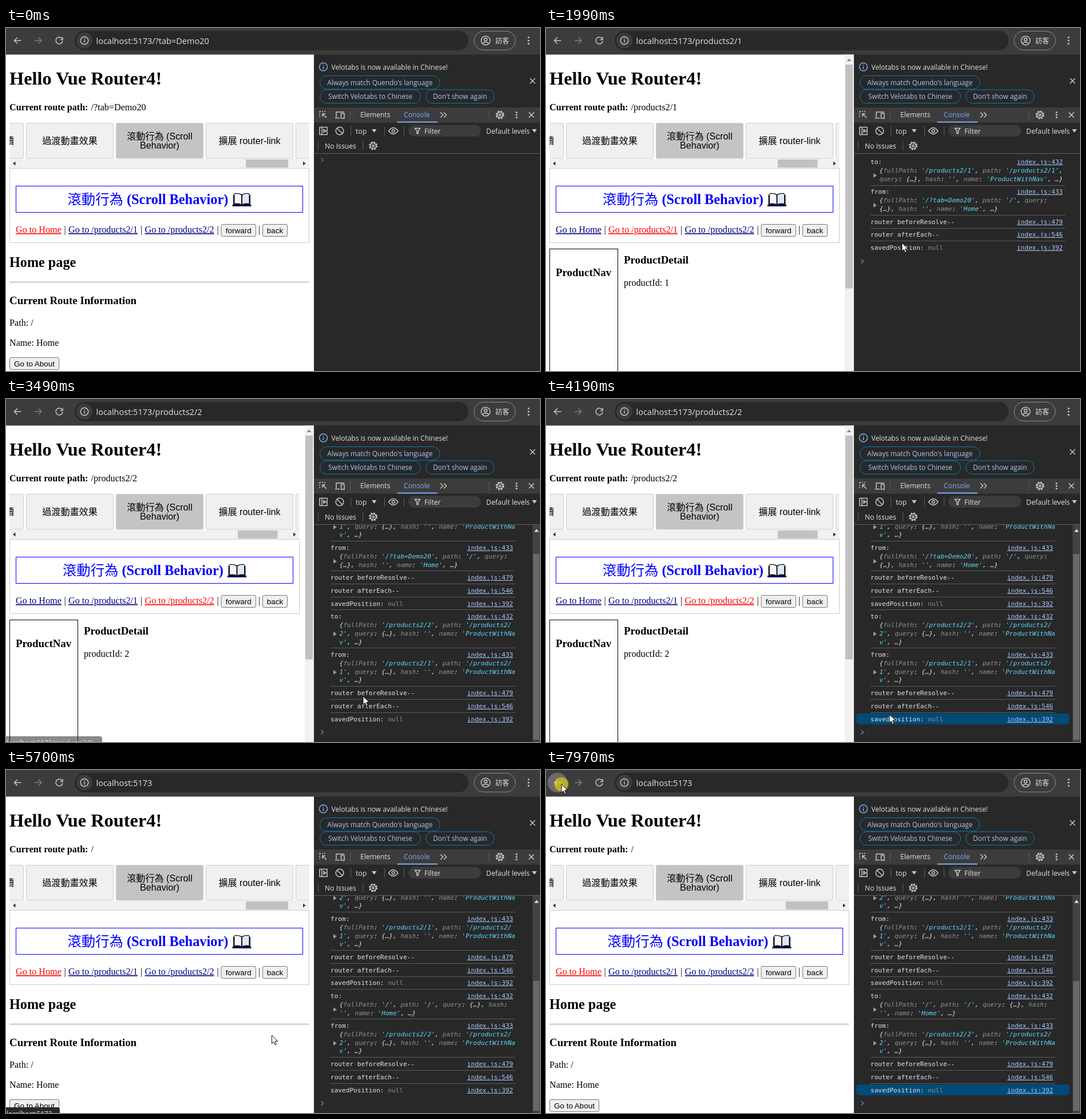
An HTML page that plays this animation: 933x600 px, repeating every 8000 ms.

```html
<!DOCTYPE html>
<html lang="zh-Hant">
<head>
<meta charset="utf-8">
<title>Router scroll behavior</title>
<style>
  html, body { margin: 0; width: 933px; height: 600px; overflow: hidden; background: #282828; }
  svg { position: absolute; left: 0; top: 0; }
  text { white-space: pre; }
  .serif { font-family: "Liberation Serif", "Noto Sans CJK TC", "Noto Sans CJK", serif; font-size: 16.15px; }
  .sans { font-family: "Liberation Sans", "Noto Sans CJK TC", "Noto Sans CJK", sans-serif; font-size: 16.1px;
    font-weight: 300; }
  .ui { font-family: "Open Sans", "Noto Sans CJK TC", "Noto Sans CJK", sans-serif; font-size: 12.2px; fill: #e3e3e3; }
  .bold { font-weight: bold; }
  .mid { text-anchor: middle; }
  .icon { fill: none; stroke: #c7c7c7; stroke-width: 1.5; }
  #log { position: absolute; left: 539px; top: 220px; width: 394px; height: 380px; overflow: hidden;
    font: 11.1px/14.75px "DejaVu Sans Mono", monospace; color: #e3e3e3; white-space: pre; }
  #rows { position: absolute; left: 28px; top: 3.5px; width: 340px; }
  #rows.scrolled { top: auto; bottom: 28.6px; width: 323px; }
  .row { position: relative; isolation: isolate; padding: 4.8px 0 2.15px; border-bottom: 1px solid #5a5a5a; }
  .row:last-child { border-color: transparent; }
  .row a { position: absolute; right: 4px; top: 4.8px; color: #a8c7fa; text-decoration: underline; }
  .row .object { padding-left: 15.5px; font-style: italic; position: relative; }
  .object::before { content: ""; position: absolute; left: 4.5px; top: calc(50% - 4px);
    border: 4px solid transparent; border-left: 6px solid #9a9a9a; border-right: 0; }
  .key { color: #8f8f8f; }
  .string { color: #5cd5fb; }
  .selected .row:last-child::before { content: ""; position: absolute; z-index: -1; left: -25px; right: -25px;
    top: 1.3px; height: 19px; border-radius: 5px; background: #004a77; }
</style>
</head>
<body>
<svg id="frame" width="933" height="600"></svg>
<svg id="page" width="933" height="600"></svg>
<div id="log"><div id="rows"></div></div>
<svg id="overlay" width="933" height="600"></svg>
<script>
const $ = id => document.getElementById(id);
const text = (x, y, s, cls, style = '') => `<text x="${x}" y="${y}" class="${cls}" style="${style}">${s}</text>`;
const rect = (x, y, w, h, fill, more = '') => `<rect x="${x}" y="${y}" width="${w}" height="${h}" fill="${fill}" ${more}/>`;
const path = (d, more = 'class="icon"') => `<path d="${d}" ${more}/>`;
const circle = (x, y, r, more = 'class="icon"') => `<circle cx="${x}" cy="${y}" r="${r}" ${more}/>`;
const fill = c => `fill="${c}"`;
const tint = c => `class="icon" style="stroke:${c}"`;

const gear = (x, y) => circle(x, y, 6.3, 'class="icon" style="stroke-width:2.4;stroke-dasharray:2.8 2.15"')
  + circle(x, y, 5) + circle(x, y, 1.8);
const kebab = (x, y, gap) => [-gap, 0, gap].map(d => circle(x, y + d, 1.6, fill('#c7c7c7'))).join('');
const cross = (x, y) => path(`M${x - 4.5} ${y - 4.5}l9 9m0-9l-9 9`);
const divider = (x, y) => rect(x, y - 8, 1, 16, '#5e5e5e');
const chip = (x, y, w, label) => rect(x, y, w, 23.5, 'none', 'rx="11.7" stroke="#047db7"')
  + text(x + w / 2, y + 16, label, 'ui mid', 'font-size:11.8px;fill:#a8c7fa');

// Browser bar and developer panel
$('frame').innerHTML =
  rect(0, 0, 933, 47, '#3c3c3c') + rect(120, 5, 688, 34, '#282828', 'rx="17"')
  + path('M50 22h12m-5.5-5.5L62 22l-5.5 5.5', tint('#7d7d7d'))
  + path('M98 18.5a6 6 0 1 0 1 4.5M99 16v4.5h-4.5')
  + circle(137, 22, 14, fill('#3c3c3c')) + circle(137, 22, 6.8) + path('M137 21v4.5M137 18v1.6')
  + rect(818, 5.5, 72, 33, 'none', 'rx="16.5" stroke="#8e8e8e"')
  + circle(838, 22, 7.8) + circle(838, 20, 2.6) + path('M832.5 27q5.5-4.5 11 0')
  + text(855, 27, '訪客', 'ui', 'font-size:12px') + kebab(913, 22, 5.5)
  + rect(538, 46.5, 395, 553.5, '#282828') + rect(538, 139, 395, 26.5, '#3c3c3c')
  + circle(554.5, 68, 7, tint('#7cacf8')) + path('M554.5 67v5M554.5 64v1.6', tint('#7cacf8'))
  + text(568.5, 72.5, 'Velotabs is now available in Chinese!', 'ui', 'font-size:12px')
  + chip(548.5, 83.5, 209.5, "Always match Quendo's language")
  + chip(548.5, 108, 176, 'Switch Velotabs to Chinese') + chip(733.5, 108, 119.5, "Don't show again")
  + cross(920, 92.5)
  + path('M548 146h12M548 146v11', 'class="icon" stroke-dasharray="2 2"') + path('M560 157l-7-7m0 5v-5h5')
  + path('M577 156v-9h14M575 157.5h8') + rect(585.5, 149.5, 5.5, 8.5, 'none', 'class="icon"')
  + divider(601, 152) + text(619, 156, 'Elements', 'ui') + text(695, 156, 'Console', 'ui', 'fill:#7cacf8')
  + rect(683.5, 163.5, 70.5, 2, '#7cacf8') + path('M759 147.5l4.5 4.5-4.5 4.5m6-9l4.5 4.5-4.5 4.5')
  + divider(843.5, 152) + gear(863, 152) + kebab(892, 152, 4.5) + cross(918, 152)
  + rect(548, 173.5, 13, 13, 'none', 'class="icon"') + path('M552 173.5v13m3-9l4 2.5-4 2.5z')
  + circle(583, 180, 6.8) + path('M578.3 175.3l9.4 9.4')
  + divider(602, 180) + text(611, 184.5, 'top', 'ui') + path('M639 177h8.5l-4.2 6z', fill('#c7c7c7'))
  + divider(661, 180) + path('M668.5 180q8.2-11 16.4 0q-8.2 11-16.4 0z') + circle(676.7, 180, 2.4)
  + divider(695, 180) + rect(703, 169.5, 127, 20.5, '#3c3c3c', 'rx="10.2"')
  + path('M714.5 175.5h9l-3.3 4.5v4.5h-2.4V180z') + text(731, 184.5, 'Filter', 'ui')
  + text(839, 184.5, 'Default levels', 'ui') + path('M919 177h8.5l-4.2 6z', fill('#c7c7c7'))
  + divider(545, 206) + text(557, 210.5, 'No Issues', 'ui') + divider(623, 206) + gear(641.5, 206)
  + rect(538, 219, 395, 1, '#5e5e5e');

const ROUTES = [
  { at: 0, url: '/?tab=Demo20', product: 0 },
  { at: 1040, url: '/products2/1', product: 1 },
  { at: 3090, url: '/products2/2', product: 2 },
  { at: 5370, url: '/', product: 0 },
];

const button = (x, y, w, label) => rect(x + .5, y + .5, w - 1, 21, '#efefef', 'rx="2.5" stroke="#767676"')
  + text(x + w / 2, y + 15.5, label, 'sans mid', 'font-size:13.45px');
const tab = (x, w, active) => rect(x + .5, 166.5, w, 61.5, active ? '#c5c3c3' : '#f0f0f0', 'rx="2" stroke="#cbcbcb"');
const link = (x, label, active) =>
  text(x, 358, label, 'serif', `fill:${active ? '#f00' : '#000080'};text-decoration:underline`);

function book(x) {
  const leaf = s => `M${s * 12.5}-9.5Q${s * 6}-11 ${s}-7.5V8Q${s * 6} 5.5 ${s * 12.5} 7Z`;
  return `<g transform="translate(${x} 300)">` + path('M-15 9V-8.5h2V-11Q-6-12 0-9Q6-12 13-11v2.5h2V9z', fill('#11111c'))
    + path(leaf(-1), fill('#f7f7f7')) + path(leaf(1), fill('#dfe9f4')) + rect(-16.5, 9, 33, 3, '#0a0a50') + '</g>';
}

function drawPage({ url, product }) {
  const right = product ? 512 : 529;
  const shift = product ? -8.5 : 0;
  const body = product
    ? rect(6.5, 386.5, 119, 230, '#fff', 'stroke="#000"')
      + text(17, 433.5, 'ProductNav', 'serif bold', 'font-size:18.9px')
      + text(136, 412, 'ProductDetail', 'serif bold', 'font-size:18.9px')
      + text(136, 451, 'productId: ' + product, 'serif')
      + rect(522, 46.5, 16, 553.5, '#f1f1f1') + rect(523, 64, 13, 391.5, '#c1c1c1')
      + path('M525.5 58h8l-4-4.5z', fill('#888'))
    : text(6, 418, 'Home page', 'serif bold', 'font-size:24.2px') + rect(6, 444, 523.5, 1, '#9a9a9a')
      + text(6, 482.5, 'Current Route Information', 'serif bold', 'font-size:18.9px')
      + text(6, 521, 'Path: /', 'serif') + text(6, 556, 'Name: Home', 'serif')
      + button(6, 576, 87, 'Go to About');
  $('page').innerHTML =
    text(157.5, 27.5, 'localhost:5173' + (url === '/' ? '' : url), 'ui', 'font-size:14.5px')
    + rect(0, 46.5, 538, 553.5, '#fff')
    + text(6, 98.5, 'Hello Vue Router4!', 'serif bold', 'font-size:32.4px')
    + text(6, 143.5, 'Current route path:', 'serif bold') + text(148.5, 143.5, url, 'serif')
    + `<clipPath id="strip">${rect(6, 160, right - 5.5, 90, '#000')}</clipPath><g clip-path="url(#strip)">`
    + tab(-122, 152) + tab(35, 152) + tab(192, 152, true) + tab(349, 152) + tab(506, 152)
    + text(-2, 202.5, '讀', 'sans') + text(111.5, 202.5, '過渡動畫效果', 'sans mid')
    + text(268.5, 194.5, '滾動行為 (Scroll', 'sans mid') + text(268.5, 211, 'Behavior)', 'sans mid')
    + text(425.5, 202.5, '擴展 router-link', 'sans mid')
    + rect(6, 229, right, 16.5, '#f1f1f1')
    + (product ? rect(405, 230, 69.5, 14, '#c1c1c1') : rect(419, 230, 74, 14, '#c1c1c1'))
    + path(`M16.5 233.5v7l-4.5-3.5zM${right - 10} 233.5v7l4.5-3.5z`, fill('#333')) + '</g>'
    + rect(6.5, 245.5, right - 6, 130, 'none', 'stroke="#ccc"')
    + rect(17.5, 276.5, right - 28, 46, 'none', 'stroke="#00f"')
    + text(107.5 + shift, 307.5, '<tspan style="font-weight:500">滾動行為</tspan> (Scroll Behavior)',
      'serif bold', 'font-size:24.35px;fill:#00f')
    + book(412 + shift)
    + link(17, 'Go to Home', !product) + link(109, 'Go to /products2/1', product === 1)
    + link(242.5, 'Go to /products2/2', product === 2)
    + [101.5, 235, 368.5, 441].map(x => text(x, 358, '|', 'serif')).join('')
    + button(375.5, 343, 61.5, 'forward') + button(448, 343, 44, 'back') + body;
}

// Console
const row = (label, line, object = '') => `<div class="row">${label}<a>index.js:${line}</a>`
  + (object && `<div class="object">${object.replace(/('[^']*')|(\b[a-zA-Z]+(?=:))/g,
    (m, string) => `<span class="${string ? 'string' : 'key'}">${m}</span>`)}</div>`) + '</div>';
const visit = (to, from) => row('to:', 432, to) + row('from:', 433, from)
  + row('router beforeResolve--', 479) + row('router afterEach--', 546)
  + row('savedPosition: <span class="key">null</span>', 392);
const productObject = (id, narrow) => {
  const [slashBreak, commaBreak, nameBreak] = narrow ? ['\n', ' ', '\n'] : ['', '\n', ''];
  return `{fullPath: '/products2/${id}', path: '/products2/${slashBreak}${id}',${commaBreak}`
    + `query: {…}, hash: '', name: 'ProductWithNa${nameBreak}v', …}`;
};
const START = "{fullPath: '/?tab=Demo20', path: '/', query:\n{…}, hash: '', name: 'Home', …}";
const HOME = "{fullPath: '/', path: '/', query: {…}, hash:\n'', name: 'Home', …}";

function drawLog(step) {
  const narrow = step > 1;
  const visits = [[productObject(1, narrow), START], [productObject(2, true), productObject(1, true)],
    [HOME, productObject(2, true)]];
  $('rows').innerHTML = visits.slice(0, step).map(v => visit(...v)).join('');
}

function drawConsoleEdge(step, selected) {
  const y = [231, 408, 583, 583][step];
  let out = path(`M550.5 ${y - 3.5}l4 3.5-4 3.5`, tint(step ? '#5b86c8' : '#5a6d8c'));
  if (selected) out += rect(564, 576, 1, 14, '#123a5c');
  if (step > 1) {
    const top = step === 2 ? 271 : 369;
    out += rect(920, 220, 13, 380, '#424242') + rect(921, top, 11, 596 - top, '#686868')
      + path('M923 232.5h8l-4-5z', fill('#e3e3e3'));
  }
  return out;
}

// Pointer: time, x, y
const MOVES = [
  [260, 242, 510], [800, 183, 352], [1010, 183, 352], [1310, 625, 328], [1600, 622, 376], [2150, 622, 376],
  [2350, 560, 388], [2640, 307, 355], [3090, 307, 355], [3490, 624, 520], [3850, 600, 552], [4200, 600, 552],
  [4670, 141, 363], [4900, 71, 360], [5400, 71, 360], [5850, 600, 500], [6300, 594, 552], [6660, 594, 548],
  [6880, 620, 555], [7200, 384, 365], [7440, 85, 52], [7740, 27, 25], [8000, 27, 25],
];
const CLICKS = [[820, 1040], [2880, 3090], [5230, 5370], [7900, 8000]];
const TIPS = [[1040, 1550, '/products2/2', 168], [2880, 3400, '/products2/2', 168], [5440, 5840, '', 94]];
const within = (t, [from, to]) => t >= from && t < to;

function pointerAt(t) {
  const i = MOVES.findIndex(m => m[0] > t);
  const [t0, x0, y0] = MOVES[i - 1], [t1, x1, y1] = MOVES[i];
  const p = (t - t0) / (t1 - t0), e = p * p * (3 - 2 * p);
  return [x0 + (x1 - x0) * e, y0 + (y1 - y0) * e];
}

function drawPointer(t) {
  if (t < MOVES[0][0]) return '';
  const [x, y] = pointerAt(t);
  const hand = x < 366 && y > 343 && y < 366;
  const shape = hand
    ? 'M-1.4 11V1.6Q0-.4 1.4 1.6V7.2Q2.8 5.8 4.1 7.4Q5.5 6.4 6.7 8.1Q8.6 7.4 9.2 9.4V14L7.4 17.5V19.5H-.6V17.6L-4.8 11.6Q-4.6 9-2.6 10Z'
    : 'M0 0V14.5L3.3 11.4 5.5 16.6 7.9 15.6 5.7 10.4H10.4Z';
  const halo = CLICKS.some(c => within(t, c)) ? circle(x, y, 12.3, 'fill="#f0dc00" opacity=".6"') : '';
  return halo + path(shape, `transform="translate(${x} ${y})" fill="#fff" stroke="#111" stroke-width="1"`);
}

function drawTip(t) {
  const tip = TIPS.find(([from, to]) => within(t, [from, to + 200]));
  if (!tip) return '';
  const opacity = Math.min(1, 1 - (t - tip[1]) / 200);
  return `<g opacity="${opacity}">` + rect(-5, 590, tip[3] + 5, 20, '#282828', 'rx="4"')
    + text(1, 605.5, 'localhost:5173' + tip[2], 'ui', 'font-size:11.8px') + '</g>';
}

const drawBack = hover => (hover ? circle(20, 22, 17.3, fill('#6b6b6b')) : '')
  + path('M26.5 22H14.5m5.5-5.5L14.5 22l5.5 5.5');

let shown = -1;
function render(t) {
  const step = ROUTES.filter(r => r.at <= t).length - 1;
  const selected = within(t, [4000, 5370]) || t >= 6380;
  if (step !== shown) {
    shown = step;
    drawPage(ROUTES[step]);
    drawLog(step);
  }
  $('rows').className = (step > 1 ? 'scrolled ' : '') + (selected ? 'selected' : '');
  $('overlay').innerHTML = drawConsoleEdge(step, selected) + drawBack(t >= 7900) + drawTip(t) + drawPointer(t);
}

const start = performance.now();
function tick() {
  render((performance.now() - start) % 8000);
  requestAnimationFrame(tick);
}
tick();
</script>
</body>
</html>
```
